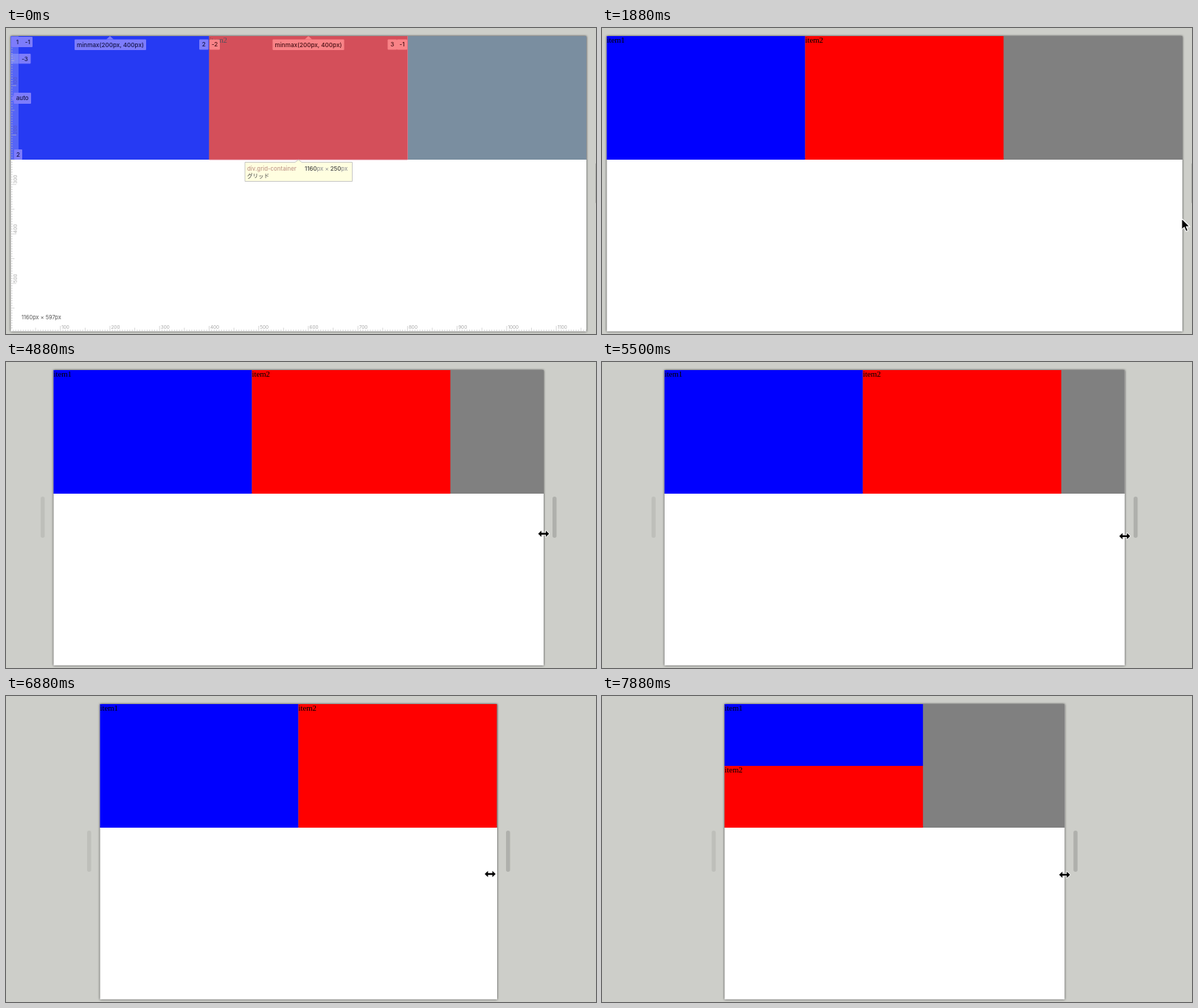
Recreate the animation shown at these times as an HTML page. Size 800 by 416 pixels, loop 8000 ms.

```html
<!DOCTYPE html>
<html lang="ja">
<head>
<meta charset="utf-8">
<title>Grid resize</title>
<style>
  html, body { margin: 0; width: 100%; height: 100%; overflow: hidden; background: #cdcec9; }
  svg { display: block; width: 800px; height: 416px; }
  .page { fill: #fff; filter: drop-shadow(0 0.5px 1.5px rgba(0,0,0,.75)); }
  .item { font: 10.76px "Liberation Serif", serif; }
  .label { font: 500 8.1px Inter, sans-serif; }
  .tip { font: 500 7.8px Inter, sans-serif; fill: #444; }
  .size { font: 7.4px Inter, sans-serif; fill: #555; }
  .num { font: 6.4px Inter, sans-serif; fill: #aaa; }
  .onBlue { fill: #5557c8; }
  .tick { stroke: #bbb; stroke-width: .6; fill: none; }
</style>
</head>
<body>
<svg viewBox="0 0 800 416">
  <rect id="gripL" y="183" width="5.5" height="56" rx="2.7" fill="#bebfba"/>
  <rect id="gripR" y="183" width="5.5" height="56" rx="2.7" fill="#afb0ac"/>
  <rect id="page" class="page" y="11" height="401.5"/>
  <rect id="box" y="11" height="168" fill="#808080"/>
  <rect id="blue" y="11" width="269" fill="#00f"/>
  <rect id="red" width="269" fill="#f00"/>
  <text id="t1" class="item" y="20.4">item1</text>
  <text id="t2" class="item">item2</text>
  <g id="overlay"></g>
  <path id="arrow" d="M0 0V15.2L3.5 11.9 6 17.6 8.6 16.5 6.2 11H11Z" stroke="#fff" stroke-width="1.1" stroke-linejoin="round"/>
  <path id="resize" d="M-7.4 0L-3-4.2V-1.3H3V-4.2L7.4 0 3 4.2V1.3H-3V4.2Z" stroke="#fff" stroke-width="1.6" paint-order="stroke" stroke-linejoin="round"/>
</svg>
<script>
const $ = id => document.getElementById(id);
const set = (id, attrs) => { for (const k in attrs) $(id).setAttribute(k, attrs[k]); };
const LOOP = 8000, STEP = 125, MID = 396.75, COL = 269, LEFT = 6.5, TOP = 11, UNIT = 67.24;

// Inspector overlay
const rect = (x, y, w, h, fill, more = '') =>
  `<rect x="${x}" y="${y}" width="${w}" height="${h}" fill="${fill}" ${more}/>`;
const text = (x, y, s, cls, more = '') => `<text x="${x}" y="${y}" class="${cls}" ${more}>${s}</text>`;
const path = (d, fill, more = '') => `<path d="${d}" fill="${fill}" ${more}/>`;
const tag = (x, y, w, h, s, fill, color = '#15154a') =>
  rect(x, y, w, h, fill, 'rx="1"') +
  text(x + w / 2, y + h / 2 + 2.9, s, 'label', `text-anchor="middle" fill="${color}"`);

function rulers() {
  let out = '', ticks = '';
  for (let i = 1; i * UNIT / 20 < 780; i++) {
    const d = i * UNIT / 20, len = i % 20 ? i % 10 ? 2 : 4.5 : 7;
    ticks += `M${LEFT + d} 412v${-len}`;
    if (d < 400) ticks += `M${LEFT + .5} ${TOP + d}h${len}`;
    if (i % 20) continue;
    const n = i * 5;
    out += text(LEFT + d + 1.5, 408.5, n, 'num');
    if (n <= 500) out += text(0, 0, n, d < 168 ? 'num onBlue' : 'num',
      `transform="translate(15.3 ${TOP + d - 1}) rotate(-90)"`);
  }
  return `<path class="tick" d="${ticks}"/>` + out;
}

const BLUE = '#7d7cfb', RED = '#f98387', WINE = '#4a1015';
$('overlay').innerHTML =
  rect(LEFT, TOP, 780.5, 168, 'rgba(111,168,220,.345)') +
  rect(LEFT + COL, TOP, COL, 168, 'rgba(230,140,130,.25)') +
  rect(LEFT, TOP, 10.5, 168, 'rgba(255,255,255,.22)') +
  path('M275.5 179H544.5V11', 'none', 'stroke="#e0758c" stroke-width=".8"') +
  rulers() +
  tag(7, 12, 17, 14, '1', BLUE) + tag(22.5, 12, 13.5, 14, '-1', BLUE) +
  text(9, 44.5, '1', 'label', 'fill="#6a6be0"') +
  rect(7, 35, 12, 13.5, 'rgba(255,255,255,.2)') + tag(17.5, 35, 16, 13.5, '-3', BLUE) +
  path('M7 95.5L11 91V100Z', BLUE) + tag(10.5, 88, 23.5, 15, 'auto', BLUE) +
  tag(11, 165, 11, 14, '2', BLUE) +
  path('M141 11L146 15.6H136Z', BLUE) + tag(93, 15.5, 97, 14.5, 'minmax(200px, 400px)', BLUE) +
  tag(262, 15.5, 12.5, 14, '2', BLUE) +
  tag(276, 15.5, 14, 14, '-2', RED, WINE) +
  path('M410 11L415 15.6H405Z', RED) + tag(361.5, 15.5, 97, 14.5, 'minmax(200px, 400px)', RED, WINE) +
  tag(517.5, 15.5, 12.5, 14, '3', RED, WINE) + tag(530, 15.5, 14, 14, '-1', RED, WINE) +
  path('M324 182.5H392L396.5 179.2 401 182.5H469.5V208.5H324Z', '#fffee0', 'stroke="#bbb" stroke-width=".8"') +
  text(327, 193.8, 'div.grid-container', 'tip', 'style="fill:#c39a8c"') +
  text(405, 193.8, '1160<tspan fill="#999">px × </tspan>250<tspan fill="#999">px</tspan>', 'tip') +
  text(327, 203.8, 'グリッド', 'tip', 'style="font:500 7.5px \'Noto Sans CJK JP\',\'Noto Sans CJK\',sans-serif"') +
  text(21, 396, '1160px × 597px', 'size');

// Piecewise linear motion: [time, x, y]
const track = [
  [1250, 812, 266], [1750, 788, 259], [1875, 786, 259], [2000, 786, 260],
  [2875, 784, 224], [3000, 785, 210], [3125, 787, 226], [3375, 787, 226],
  [3750, 774, 226.5], [4250, 748, 230], [4875, 729, 233.5], [5125, 724, 235],
  [6000, 688.5, 239], [6875, 656.5, 242], [7875, 627.3, 243]
];
function pointer(t) {
  const i = track.findIndex(k => k[0] >= t);
  if (i < 0) return track[track.length - 1].slice(1);
  if (i === 0) return track[0].slice(1);
  const a = track[i - 1], b = track[i], p = (t - a[0]) / (b[0] - a[0]);
  return [1, 2].map(j => a[j] + (b[j] - a[j]) * p);
}

function draw(t) {
  const [x, y] = pointer(t), dragging = t >= 3125;
  const edge = t < 3375 ? 787 : x;
  const right = Math.abs(edge - 666) < 10 ? 666 : edge;   // the width snaps at 800px
  const left = 2 * MID - right, width = right - left;
  const wrapped = width < 2 * COL - .6;
  const rx = wrapped ? left : left + COL, ry = wrapped ? TOP + 84 : TOP;
  const h = wrapped ? 84 : 168;

  set('page', { x: left, width });
  set('box', { x: left, width });
  set('blue', { x: left, height: h });
  set('red', { x: rx, y: ry, height: h });
  set('t1', { x: left });
  set('t2', { x: rx, y: ry + 9.4 });
  set('gripL', { x: left - 17.5 });
  set('gripR', { x: right + 12 });
  set('overlay', { visibility: t < 1250 ? 'visible' : 'hidden' });
  const place = `translate(${x} ${y})`;
  set('arrow', { transform: place, visibility: t >= 1250 && !dragging ? 'visible' : 'hidden' });
  set('resize', { transform: place, visibility: dragging ? 'visible' : 'hidden' });
}

function frame() {
  draw(Math.floor(performance.now() % LOOP / STEP) * STEP);
  requestAnimationFrame(frame);
}
frame();
</script>
</body>
</html>
```
